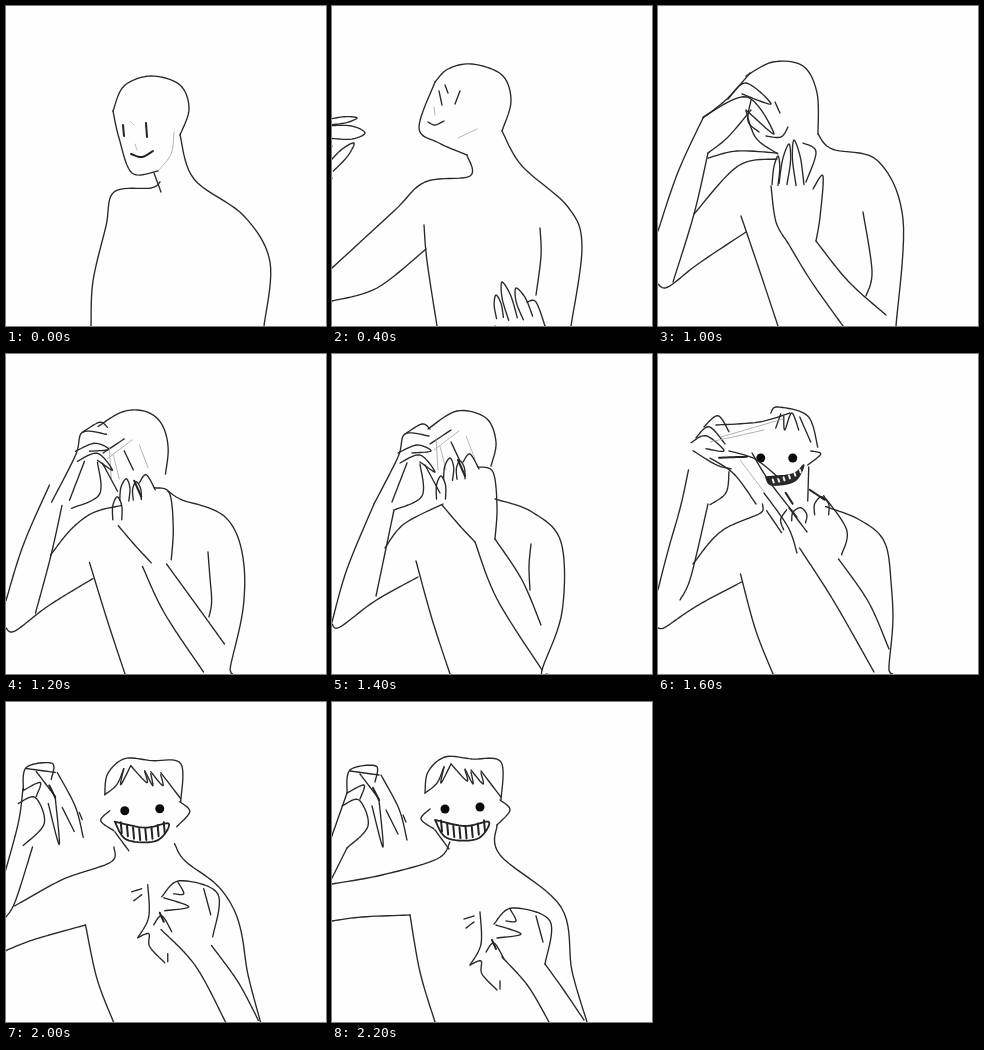
These frames come from a looping animation (320 by 320 pixels, 2300 ms). An HTML page with a canvas:

```html
<!DOCTYPE html>
<html lang="en">
<head>
<meta charset="utf-8">
<title>Unmasking</title>
<style>
html, body { margin: 0; width: 100%; height: 100%; overflow: hidden; background: #fefefe; }
canvas { display: block; width: 320px; height: 320px; }
</style>
</head>
<body>
<canvas id="stage"></canvas>
<script>
const LOOP = 2300, STEP = 100, SAMPLES = 60;
const KEYS = [0, 400, 800, 1000, 1400, 1800, 2200];

// A stroke may open with a pen mark: [width, colour, fill]
const PENS = {
  '~': [0.9, '#aaa'],
  '!': [2, '#222'],
  '*': [9, '#0b0b0b'],
  '#': [1.4, '#222', '#2b2b2b'],
  '=': [1.8, '#222', '#fefefe'],
  '^': [2, '#eee']
};
const INK = [1.35, '#282828'];
const lerp = (a, b, k) => a + (b - a) * k;
const mix = (p, q, k) => [lerp(p[0], q[0], k), lerp(p[1], q[1], k)];

// Smooth curve through a few points, as a dense polyline.
function curve(p) {
  const out = [], at = i => p[Math.max(0, Math.min(p.length - 1, i))];
  for (let i = 0; i < p.length - 1; i++) {
    const [a, b, c, d] = [at(i - 1), at(i), at(i + 1), at(i + 2)];
    for (let t = 0; t < 0.99; t += 0.1)
      out.push([0, 1].map(n => b[n] + 0.5 * t * (c[n] - a[n]
        + t * (2 * a[n] - 5 * b[n] + 4 * c[n] - d[n] + t * (3 * (b[n] - c[n]) + d[n] - a[n])))));
  }
  out.push(at(p.length));
  return out;
}

// Finger from base to tip, open at the base.
function finger(x, y, tx, ty, w) {
  const len = Math.hypot(tx - x, ty - y);
  const nx = (y - ty) / len * w / 2, ny = (tx - x) / len * w / 2;
  const side = (k, s) => [lerp(x, tx, k) + nx * s, lerp(y, ty, k) + ny * s];
  return [curve([side(0, -1), side(0.6, -1), [tx, ty], side(0.6, 1), side(0, 1)])];
}

// Row of n upright ticks, lower in the middle by sag.
function teeth(x, y, tx, ty, h, n, sag) {
  return Array.from({ length: n }, (_, i) => {
    const k = i / (n - 1), cx = lerp(x, tx, k), cy = lerp(y, ty, k) + sag * Math.sin(k * Math.PI);
    return [[cx, cy - h / 2], [cx + 1, cy + h / 2]];
  });
}

// Evenly spaced points along a polyline.
function resample(line) {
  const sums = [0], out = [];
  for (let i = 1; i < line.length; i++)
    sums.push(sums[i - 1] + Math.hypot(line[i][0] - line[i - 1][0], line[i][1] - line[i - 1][1]));
  for (let n = 0, i = 1; n <= SAMPLES; n++) {
    const want = sums[sums.length - 1] * n / SAMPLES;
    while (i < line.length - 1 && sums[i] < want) i++;
    out.push(mix(line[i - 1], line[i], (want - sums[i - 1]) / (sums[i] - sums[i - 1] || 1)));
  }
  return out;
}

function parse(text) {
  const pen = PENS[text[0]] || INK;
  const v = text.match(/-?[\d.]+/g).map(Number);
  if (text.includes('U')) return { pen, lines: finger(...v) };
  if (text.includes('T')) return { pen, lines: teeth(...v) };
  const points = [];
  for (let i = 0; i < v.length; i += 2) points.push([v[i], v[i + 1]]);
  return { pen, lines: [curve(points)] };
}

const morphs = {}, groups = {};

// One line that changes shape from key to key.
function morph(name, shapes) {
  morphs[name] = {};
  for (const key in shapes) {
    const line = parse(shapes[key]).lines[0];
    morphs[name][key] = { line, even: resample(line) };
  }
}

// A drawing that travels whole and is redrawn halfway to the next key.
function group(name, key, ...texts) {
  const strokes = texts.map(parse), points = strokes.flatMap(s => s.lines.flat());
  const mid = [0, 1].map(j => {
    const v = points.map(p => p[j]);
    return (Math.min(...v) + Math.max(...v)) / 2;
  });
  (groups[name] ||= {})[key] = { strokes, mid };
}

morph('skull', {
  0: '107 105 118 80 145 70 174 79 183 103 174 129',
  400: '103 76 116 63 140 58 170 69 179 95 170 125',
  800: '92 52 128 48 154 63 159 85 151 118',
  1000: '88 70 115 56 145 60 159 87 160 128',
  1400: '96 75 125 57 154 64 164 88 159 112'
});
morph('jaw', {
  0: '107 105 113 132 126 167 152 165',
  400: '103 76 87 122 107 137 135 149',
  800: '86 121 95 132 122 142 129 157',
  1000: '88 105 98 132 120 148'
});
morph('back', {
  0: '174 129 188 173 238 210 264 256 258 320',
  400: '170 125 190 160 236 201 250 240 239 320',
  800: '151 118 166 147 235 175 249 250 257 320',
  1000: '160 128 174 143 220 155 245 213 238 320',
  1400: '163 145 200 158 229 188 230 258 210 316 215 320',
  1800: '172 160 222 187 235 238 254 320',
  2200: '165 123 168 153 229 205 240 269 255 320'
});
morph('arm', {
  0: '154 176 145 182 108 186 100 220 87 275 85 320',
  400: '135 149 138 170 93 176 62 205 0 262',
  800: '129 151 100 157 60 194 22 227',
  1000: '119 153 80 160 36 208',
  1400: '111 150 72 170 53 194',
  1800: '98 150 103 164 55 184 17 226',
  2200: '118 140 105 157 50 173 0 182'
});
morph('underarm', {
  400: '0 295 45 282 94 243',
  800: '0 287 6 288 55 243 88 214',
  1000: '0 278 10 281 40 258 88 226',
  1400: '0 270 8 273 43 247 86 223',
  1800: '0 278 28 260 81 233',
  2200: '0 219 30 215 78 213'
});
morph('flank', {
  400: '92 219 95 255 105 320',
  800: '83 215 95 250 117 320',
  1000: '83 210 100 260 120 320',
  1400: '84 207 100 265 118 320',
  1800: '81 233 94 283 112 320',
  2200: '78 213 88 270 103 320'
});
morph('armpit', {
  400: '208 222 209 250 204 289',
  800: '207 221 215 260 217 320',
  1000: '205 206 214 265 208 290',
  1400: '199 190 197 212 198 236'
});
morph('leftOuter', {
  400: '-60 240 0 140',
  800: '0 167 20 120',
  1000: '0 225 20 166 45 112',
  1400: '0 268 15 215 42 150',
  1800: '0 203 17 130 19 82',
  2200: '-4 145 15 91'
});
morph('leftInner', {
  400: '-60 270 0 172',
  800: '8 250 22 227 36 142',
  1000: '15 276 36 208 50 147',
  1400: '44 242 62 156',
  1800: '0 250 17 226 38 144',
  2200: '-4 184 15 146'
});
morph('rightOuter', {
  400: '163 320 200 390',
  800: '125 258 145 281 171 320',
  1000: '130 237 153 275 185 320',
  1400: '143 188 165 245 210 316',
  1800: '140 200 184 245 222 320',
  2200: '170 255 196 284 217 320'
});
morph('rightInner', {
  400: '213 320 250 390',
  800: '187 255 182 291 196 320',
  1000: '158 235 190 275 228 309',
  1400: '163 185 190 226 209 271',
  1800: '198 225 231 270 253 319',
  2200: '213 262 231 287 252 318'
});

group('face', 0, '!117 119 118 130', '!140 117 141 131', '~124 115 128 119', '~129 138 131 144',
  '!125 148 136 151 147 145', '~168 126 165 148 152 165', '148 167 155 186');
group('face', 400, '107 85 110 99', '128 85 123 98', '113 79 116 87', '~102 101 103 109',
  '96 116 103 119 112 115', '~126 132 145 123');
group('face', 800, '110 83 110 97', '95 121 103 122 112 118', '~114 137 128 126');
group('face', 1000, '117 96 122 107', '108 130 123 131 130 121');
group('face', 1400, '98 90 119 76', '~102 96 127 77', '~108 92 114 116', '119 88 128 107',
  '~134 82 143 105', '~104 84 106 116');
group('face', 1800, '125 63 132 57 162 66 172 97', '135 64 130 78', '138 66 139 80 146 63 153 80',
  '154 67 165 92', '165 101 175 104 162 115', '163 117 162 151', '*115 108 115 108.1', '*147 108 147 108.1',
  '#120 127 147 124 158 115 149 131 126 135 120 127', '^T127 131 154 121 3 6 2');
group('face', 2200, '93 91 96 70 113 55 140 57 169 60 169 98', '93 91 105 81 112 65', '112 65 109 81 119 62',
  '119 62 135 79 133 68', '133 67 141 82 139 70', '139 68 151 82 149 71', '149 69 169 95',
  '98 107 89 117 102 127', '168 98 178 108 165 123', '*113 107 113 107.1', '*148 105 148 105.1',
  '=103 118 133 124 157 120 145 137 115 136 103 118', '!T109 124 152 124 11 8 7', '103 128 117 147');

group('left', 400, 'U0 126 33 127 13', 'U-2 116 25 112 6', 'U-2 162 22 137 9');
group('left', 800, '20 120 50 94 75 60 92 56', '68 73 85 65 104 83', '50 94 79 79 105 83 85 68',
  '82 79 82 103 89 110', '40 131 65 125 93 97 87 119 67 129', '36 142 62 138 111 139');
group('left', 1000, '45 112 70 92 92 67', '70 93 88 77 113 98 84 88', '45 111 89 91 116 128 88 104',
  '50 147 70 131 93 104', '93 94 90 115 101 126', '50 152 79 145 119 147');
group('left', 1400, '42 150 66 103 73 80 97 82', '73 80 90 70 98 75', '66 99 85 91 99 97 80 99',
  '68 109 88 101 103 118 88 108', '62 156 90 142 88 110', '93 111 108 139', '75 109 60 148');
group('left', 1800, '19 82 34 75 52 90 34 88', '24 77 37 66 53 83', '32 66 46 55 57 71',
  '21 90 44 104 59 108', '57 111 54 132 38 144', '!47 97 75 96');
group('left', 2200, '15 91 18 68 44 64 43 80', '18 69 47 73', '15 91 32 83 28 97', '28 72 47 97',
  '10 104 27 98 36 124 15 146', '49 73 67 107 75 138', '47 98 51 145 40 104', '54 108 66 132',
  '!41 86 47 98', '71 113 74 120');

group('right', 400, 'U168 312 164 289 7', 'U181 313 170 276 9', 'U196 312 184 282 10', '195 296 204 296 213 320');
group('right', 800, 'U125 262 128 219 7', 'U134 254 127 207 8', 'U155 252 140 208 15', 'U167 245 170 221 11',
  '173 224 186 244 187 255');
group('right', 1000, 'U117 179 120 150 6', 'U125 178 131 138 8', 'U142 179 136 134 8', '145 137 158 146 148 176',
  '155 183 165 170 162 211 158 235', '113 180 118 216 130 237');
group('right', 1400, 'U109 145 109 122 9', 'U116 126 118 104 9', 'U129 125 128 107 8', '!126 106 133 122',
  '131 108 138 100 147 115', '146 113 161 118 165 153 163 185', '110 151 128 172 143 188');
group('right', 1800, 'U155 192 157 178 14', 'U178 185 178 167 14', '180 166 203 200 198 225', '140 200 137 190 143 180',
  '!166 160 181 170', '!142 163 149 174', '123 181 138 203');
group('right', 2200, '162 222 180 206 218 219 213 262', '164 223 189 232 165 236', '178 207 184 219 174 219',
  '204 214 211 240', '148 210 149 242 138 263', '138 263 149 259 150 272 165 288', '!160 238 164 247',
  '154 250 162 241 172 257', '132 217 142 214', '134 226 142 220', '168 279 168 287');

group('skin', 1800, '58 71 101 68 132 59', '~63 83 125 65', '~52 88 106 76', '52 104 76 120 98 150',
  '71 97 97 105 121 124', '94 99 111 127 139 163', '106 139 130 173 139 199', '~82 106 107 139', '131 154 149 178');

const canvas = document.getElementById('stage'), ctx = canvas.getContext('2d');
const ratio = window.devicePixelRatio || 1;
canvas.width = canvas.height = 320 * ratio;
ctx.scale(ratio, ratio);
ctx.lineCap = ctx.lineJoin = 'round';

function ink(line, [width, color, fill], dx = 0, dy = 0) {
  ctx.beginPath();
  for (const [x, y] of line) ctx.lineTo(x + dx, y + dy);
  if (fill) { ctx.fillStyle = fill; ctx.fill(); }
  ctx.lineWidth = width;
  ctx.strokeStyle = color;
  ctx.stroke();
}

function draw(time) {
  ctx.fillStyle = '#fefefe';
  ctx.fillRect(0, 0, 320, 320);
  const i = KEYS.filter(key => key <= time).length - 1;
  const a = KEYS[i], b = KEYS[i + 1] ?? LOOP;
  const k = i + 1 < KEYS.length ? (time - a) / (b - a) : 0;
  const [near, far] = k < 0.5 ? [a, b] : [b, a];
  const away = Math.min(k, 1 - k);

  for (const track of Object.values(morphs)) {
    const here = track[near], there = track[far];
    if (!here) continue;
    ink(there && away ? here.even.map((p, n) => mix(p, there.even[n], away)) : here.line, INK);
  }
  for (const track of Object.values(groups)) {
    const here = track[near], there = track[far];
    if (!here) continue;
    const [dx, dy] = here.mid.map((v, j) => there ? (there.mid[j] - v) * away : 0);
    for (const { lines, pen } of here.strokes) lines.forEach(line => ink(line, pen, dx, dy));
  }
}

let shown = -1;
function tick() {
  const time = Math.floor(performance.now() % LOOP / STEP) * STEP;
  if (time !== shown) draw(shown = time);
  requestAnimationFrame(tick);
}
tick();
</script>
</body>
</html>
```
